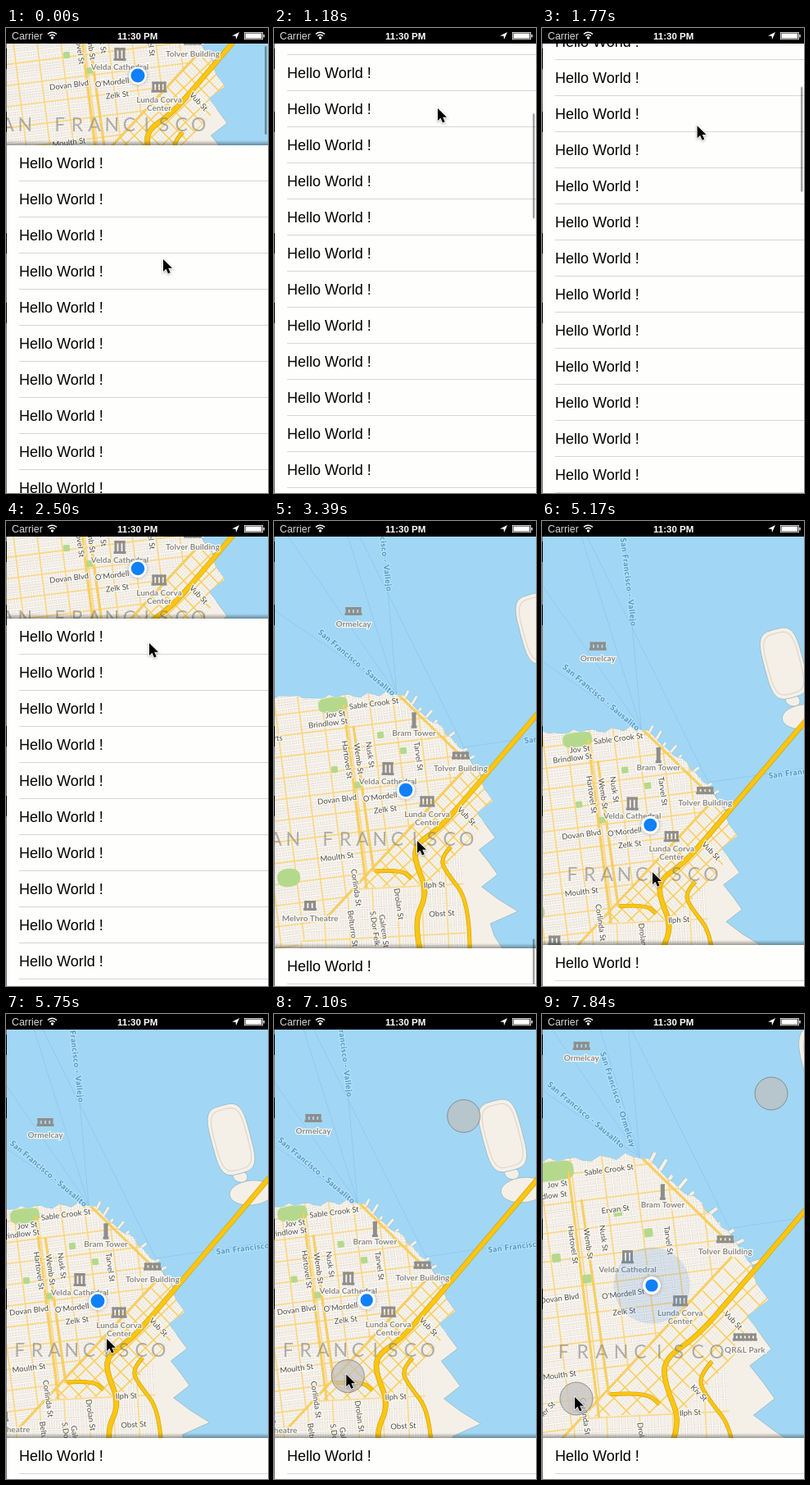
An HTML page with a canvas for the animation above (7.99 s loop, 320x567 px).

```html
<!DOCTYPE html>
<html lang="en">
<head>
<meta charset="utf-8">
<title>Map behind a list</title>
<style>
  html, body { margin: 0; width: 100%; height: 100%; overflow: hidden; background: #000; }
  canvas { display: block; width: 100vw; height: 100vh; }
</style>
</head>
<body>
<canvas id="stage" width="320" height="567"></canvas>
<script>
const ctx = document.getElementById('stage').getContext('2d');
const LOOP = 7990, STEP = 147, LAST_STEP = 53;
const SANS = '"Liberation Sans", Arial, sans-serif';
const LABEL = 'Lato, "Open Sans", sans-serif';
const LAND = '#f5f0e7', WATER = '#a1d7f4', SHORE = '#9fbfcc';
const HOME = [161, 400]; // location dot in map coordinates
const EAST = -.125, SOUTH = 1.43, DIAGONAL = .8; // street directions

// Time, list top, dot x, dot y, zoom, pointer x, pointer y
const poses = [
  [0, 143, 161, 58, 1, 192, 282],
  [1180, -319, 161, 58, 1, 200, 98],
  [2510, 119, 161, 58, 1, 175, 149],
  [3390, 521, 161, 328, 1, 175, 390],
  [4420, 517, 161, 400, 1, 152, 474],
  [5750, 517, 112, 350, 1, 123, 396],
  [6960, 517, 112, 350, 1, 91, 438],
  [7815, 517, 134, 331, 1.34, 40, 467]
];

function poseAt(t) {
  const i = poses.findIndex(p => p[0] > t);
  if (i < 0) return poses[poses.length - 1];
  const a = poses[i - 1], b = poses[i];
  const p = (t - a[0]) / (b[0] - a[0]), eased = p * p * (3 - 2 * p);
  return a.map((v, j) => v + (b[j] - v) * eased);
}

function seeded(seed) {
  return () => (seed = seed * 16807 % 2147483647) / 2147483647;
}

const times = (n, make) => Array.from({ length: n }, (_, i) => make(i));

function roughen(points, gap, amount) {
  const random = seeded(41);
  return points.slice(1).flatMap(([x, y], i) => {
    const [x0, y0] = points[i], n = Math.ceil(Math.hypot(x - x0, y - y0) / gap);
    return times(n, k => [x0 + (x - x0) * k / n, y0 + (y - y0) * k / n + (random() - .5) * amount]);
  });
}

// Rounded outline between an ellipse (power 1) and a box (power near 0)
function blob(cx, cy, rx, ry, angle, power) {
  const bend = v => Math.sign(v) * Math.abs(v) ** power, c = Math.cos(angle), s = Math.sin(angle);
  return times(32, i => {
    const a = i * Math.PI / 16, x = rx * bend(Math.cos(a)), y = ry * bend(Math.sin(a));
    return [cx + x * c - y * s, cy + x * s + y * c];
  });
}

const northShore = roughen([[-150, 291], [60, 287], [152, 282], [205, 325], [240, 362], [256, 388]], 8, 6);
const eastShore = times(16, i =>
  [256 + i + 12 * Math.sin(i * 2.1) + 22 * Math.exp(-((i - 10) ** 2)), 398 + i * 15]);
const mainland = [...northShore, ...eastShore, [-150, 680]];
const islands = [blob(349, 268, 27, 15, -.1, 1), blob(335, 248, 9, 7, .3, 1), blob(324, 203, 24, 43, -.26, .55)];
const northDistricts = [[-150, 250], [262, 250], [236, 374], [60, 560], [-150, 760]];
const southOfMarket = [[243, 368], [275, 420], [190, 515], [95, 520]];
const southDistricts = [[-150, 440], [228, 440], [240, 680], [-150, 680]];
const parks = [blob(72, 296, 18, 9, EAST, .6), blob(18, 507, 14, 11, EAST, .8),
  ...times(4, i => blob(74 + i * 28, 375 - i * 21 + i % 2 * 40, 4, 4, EAST, .3))];
const highways = [
  [[400, 215], [320, 309], [237, 407], [202, 447], [172, 467], [173, 490], [188, 525], [170, 563], [190, 640]],
  [[216, 469], [203, 483], [210, 500], [238, 535], [240, 640]],
  [[123, 499], [155, 497], [168, 508]]
];
const mainRoads = [[[234, 374], [60, 560]], [[152, 284], [226, 356]], [[85, 296], [113, 520]], [[97, 322], [122, 500]]];
const ferries = [...times(4, i => [[150, 283], [120 - 55 * i, -60 + 70 * i]]), [[232, 348], [50, -20]], [[232, 348], [480, 312]]];

// Street names with their centres, grouped by direction; late ones need a closer zoom
const streets = [
  { angle: EAST, names: [['Sable Crook St', 122, 295], ['Jov St', 75, 308], ['Brindlow St', 66, 319], ['Dovan Blvd', 77, 412],
    ["O'Mordell St", 135, 408], ['Zelk St', 136, 424], ['Moulth St', 77, 482]] },
  { angle: -.05, names: [['Ilph St', 196, 516], ['Obst St', 205, 551], ['rts', 5, 337]] },
  { angle: SOUTH, names: [['Hartovel St', 89, 363], ['Wemb St', 103, 362], ['Nusk St', 117, 357], ['Tarvel St', 176, 359],
    ['Corlinda St', 100, 519], ['Belturro St', 96, 569], ['S.Dor Felk', 123, 569], ['Galrem St', 134, 572], ['Drolan St', 152, 539]] },
  { angle: DIAGONAL, names: [['Vub St', 235, 432]] },
  { angle: DIAGONAL, late: true, names: [['Kiv St', 204, 498]] },
  { angle: EAST, late: true, names: [['Ervan St', 128, 331]] },
  { angle: -DIAGONAL, late: true, names: [['Bolner St', 62, 517]] }
];
const crossings = [
  { to: 'Vallejo', x: 134, y: 104, angle: 1.45 }, { to: 'Sausalito', x: 101, y: 245, angle: .7 },
  { to: 'Ormelcay', x: 130, y: 231, angle: 1.26, late: true }, { to: 'Alameda', x: 364, y: 333, angle: EAST }
];
const places = [
  { name: ['Ormelcay'], x: 97, y: 182, w: 21, h: 10 }, { name: ['Bram Tower'], x: 171, y: 315, w: 7, h: 19 },
  { name: ['Velda Cathedral'], x: 139, y: 374, w: 15, h: 16 }, { name: ['Tolver Building'], x: 228, y: 358, w: 22, h: 9 },
  { name: ['Lunda Corva', 'Center'], x: 187, y: 414, w: 19, h: 13 }, { name: ['Melvro Theatre'], x: 44, y: 541, w: 16, h: 12 },
  { name: ['QR&L Park'], x: 246, y: 447, w: 30, h: 9, late: true }
];

let zoom = 1, dot = HOME;
const place = (x, y) => [dot[0] + (x - HOME[0]) * zoom, dot[1] + (y - HOME[1]) * zoom];
const shown = item => !item.late || zoom > 1.15;

function path(points, close) {
  ctx.beginPath();
  for (const p of points) ctx.lineTo(...p);
  if (close) ctx.closePath();
}

function curve(points) {
  ctx.beginPath();
  ctx.moveTo(...points[0]);
  for (let i = 1; i < points.length - 1; i++) {
    const [x, y] = points[i], [nx, ny] = points[i + 1];
    ctx.quadraticCurveTo(x, y, (x + nx) / 2, (y + ny) / 2);
  }
  ctx.lineTo(...points[points.length - 1]);
}

function fill(points, color) {
  path(points, true);
  ctx.fillStyle = color;
  ctx.fill();
}

function stroke(color, width) {
  ctx.strokeStyle = color;
  ctx.lineWidth = width / zoom;
  ctx.stroke();
}

function road(points, width, color, edge) {
  curve(points);
  stroke(edge, width);
  stroke(color, width - 1.2);
}

function disc(x, y, r, color) {
  ctx.beginPath();
  ctx.arc(x, y, r, 0, 7);
  ctx.fillStyle = color;
  ctx.fill();
}

// Street blocks inside a region; every nth street is a yellow one
function grid(region, x, y, angle, gapX, gapY, nth, yellow) {
  ctx.save();
  path(region, true);
  ctx.clip();
  fill(region, LAND);
  ctx.translate(x, y);
  ctx.rotate(angle);
  for (const major of [false, true]) {
    for (let i = -50; i <= 50; i++) {
      if ((i % nth === 0) !== major) continue;
      for (const street of [[[i * gapX, -400], [i * gapX, 400]], [[-400, i * gapY], [400, i * gapY]]]) {
        path(street);
        stroke(major ? yellow : '#ded8ce', major ? 1.6 : 2.5);
        if (!major) stroke('#fffefb', 1.4);
      }
    }
  }
  ctx.restore();
}

function drawPiers() {
  for (let i = 0; i < 12; i++) {
    const p = i / 11, angle = -1.1 + .8 * p, length = 9 + 4 * Math.sin(i * 2.4);
    const x = 160 + 92 * p, y = 287 + 93 * p;
    path([[x, y], [x + length * Math.cos(angle), y + length * Math.sin(angle)]]);
    stroke(SHORE, 4.2 * zoom);
    stroke(LAND, 3 * zoom);
  }
}

function drawGround() {
  ctx.save();
  ctx.translate(...dot);
  ctx.scale(zoom, zoom);
  ctx.translate(-HOME[0], -HOME[1]);
  ctx.lineJoin = 'round';
  for (const f of ferries) {
    path(f);
    stroke('#8fc4ef', .8);
  }
  drawPiers();
  for (const land of [mainland, ...islands]) {
    fill(land, LAND);
    stroke(SHORE, 1);
  }
  path(blob(324, 203, 20, 38, -.26, .55), true);
  stroke('#ddd7cc', 1.2);

  ctx.save();
  path(mainland, true);
  ctx.clip();
  grid(southDistricts, 120, 520, -.05, 6, 12, 5, '#f9d98c');
  grid(northDistricts, 120, 320, EAST, 7.2, 6.4, 4, '#fad682');
  grid(southOfMarket, 236, 374, DIAGONAL, 8, 7, 2, '#f9cf62');
  parks.forEach(p => fill(p, '#b5d98c'));
  mainRoads.forEach(r => road(r, 2.8, '#fdd35c', '#efc052'));
  ctx.restore();
  highways.forEach((h, i) => road(h, i ? 5 : 6.5, '#fac60f', '#d49c08'));
  ctx.restore();
}

function mapLabel(text, x, y, angle, font, color, halo = 'rgba(255,253,247,.85)') {
  ctx.save();
  ctx.translate(x, y);
  ctx.rotate(angle);
  ctx.font = font + ' ' + LABEL;
  ctx.textAlign = 'center';
  ctx.textBaseline = 'middle';
  ctx.strokeStyle = halo;
  ctx.lineWidth = 2.4;
  ctx.strokeText(text, 0, 0);
  ctx.fillStyle = color;
  ctx.fillText(text, 0, 0);
  ctx.restore();
}

function drawIcon(x, y, w, h) {
  const columns = Math.round(w / 5), gap = w / columns;
  ctx.fillStyle = '#8f8e8c';
  ctx.fillRect(x - w / 2, y + h / 2 - 3, w, 3);
  ctx.fillRect(x - w / 2 + 1, y - h / 2, w - 2, 3);
  for (let i = 0; i < columns; i++) ctx.fillRect(x - w / 2 + i * gap + 1, y - h / 2, gap - 2, h);
}

function drawLabels() {
  const [cityX, cityY] = place(150.5, 461), pitch = 21.2 + 6.5 * (zoom - 1);
  ctx.font = '23px ' + LABEL;
  ctx.textAlign = 'center';
  ctx.textBaseline = 'middle';
  ctx.fillStyle = 'rgba(130,128,125,.6)';
  [...'SAN FRANCISCO'].forEach((c, i) => ctx.fillText(c, cityX + (i - 8) * pitch, cityY));

  for (const group of streets.filter(shown))
    for (const [text, x, y] of group.names) mapLabel(text, ...place(x, y), group.angle, '9.5px', '#4b4a48');
  ctx.letterSpacing = '.6px';
  for (const c of crossings.filter(shown))
    mapLabel('San Francisco - ' + c.to, ...place(c.x, c.y), c.angle, 'bold 9.6px', '#4a93c4', 'rgba(190,228,248,.8)');
  ctx.letterSpacing = '0px';
  for (const { name, x, y, w, h } of places.filter(shown)) {
    const [px, py] = place(x, y);
    drawIcon(px, py, w, h);
    name.forEach((text, i) => mapLabel(text, px, py + 15.5 + i * 10, 0, 'bold 10px', '#8a8987'));
  }
}

function drawLocation(t) {
  const pulse = ((t - 4130 + 6000) % 3000) / 1000;
  if (pulse < 1) disc(...dot, 26 + 30 * pulse, `rgba(40,125,225,${.46 * (1 - pulse)})`);
  ctx.save();
  ctx.shadowColor = 'rgba(0,0,0,.3)';
  ctx.shadowBlur = 4;
  disc(...dot, 11, '#fff');
  ctx.restore();
  disc(...dot, 8 + .5 * Math.cos(pulse * Math.PI * 2 / 3 + 2.4), '#0f80fa');
}

function drawScrollBar(t, top) {
  const resting = t > 3650 || (t > 2400 && t <= 2510);
  if (resting) return;
  const y = 22 + (top > 143 ? (top - 143) * 1.29 : (143 - top) * .178);
  ctx.fillStyle = 'rgba(0,0,0,.36)';
  ctx.beginPath();
  ctx.roundRect(316, y, 2.5, 128 - .14 * Math.max(0, top), 1.2);
  ctx.fill();
}

function drawList(t, top) {
  const shade = ctx.createLinearGradient(0, top - 6, 0, top);
  shade.addColorStop(0, 'rgba(0,0,0,0)');
  shade.addColorStop(1, 'rgba(0,0,0,.36)');
  ctx.fillStyle = shade;
  ctx.fillRect(0, top - 6, 320, 6);
  ctx.fillStyle = '#fefefd';
  ctx.fillRect(0, top, 320, 1000);
  ctx.font = '18px ' + SANS;
  ctx.textAlign = 'left';
  ctx.textBaseline = 'alphabetic';
  for (let y = top; y < 567; y += 44) {
    ctx.fillStyle = '#000';
    ctx.fillText('Hello World !', 16, y + 28);
    ctx.fillStyle = '#d6d5d8';
    ctx.fillRect(16, Math.round(y) + 43, 304, 1);
  }
  drawScrollBar(t, top);
}

function drawStatusBar() {
  ctx.fillStyle = '#000';
  ctx.fillRect(0, 0, 320, 19);
  ctx.textAlign = 'left';
  ctx.textBaseline = 'alphabetic';
  ctx.fillStyle = '#d8d8d8';
  ctx.font = '12.4px ' + SANS;
  ctx.fillText('Carrier', 7, 14);
  ctx.fillStyle = ctx.strokeStyle = '#fff';
  ctx.font = 'bold 11.5px ' + SANS;
  ctx.fillText('11:30 PM', 136, 13.5);
  ctx.lineWidth = 1.6;
  for (const r of [4.6, 7.8]) {
    ctx.beginPath();
    ctx.arc(56.5, 13, r, -2.35, -.79);
    ctx.stroke();
  }
  disc(56.5, 12, 1.7, '#fff');
  fill([[285, 5], [276, 9.5], [280.5, 9.8], [281, 14]], '#fff');
  ctx.lineWidth = .8;
  ctx.strokeRect(291.4, 5.4, 22, 8.4);
  ctx.fillRect(292.5, 6.5, 19.8, 6.2);
  ctx.fillRect(314.4, 8, 1.3, 3.4);
}

function drawEdge() {
  ctx.fillStyle = '#777';
  ctx.fillRect(0, 19, 1, 548);
  ctx.fillStyle = '#000';
  for (const y of [25, 102, 250, 335]) ctx.fillRect(0, y, 1, 25);
}

function drawPointer(t, x, y) {
  if (t > 6300) {
    for (const [cx, cy] of [[x + 2, y + 2], [320 - x, 564 - y]]) {
      disc(cx, cy, 20, 'rgba(192,190,188,.7)');
      ctx.strokeStyle = 'rgba(120,120,120,.75)';
      ctx.lineWidth = 1;
      ctx.stroke();
    }
  }
  ctx.save();
  ctx.translate(x, y);
  ctx.shadowColor = 'rgba(0,0,0,.35)';
  ctx.shadowBlur = 3;
  ctx.shadowOffsetY = 1;
  path([[0, 0], [0, 15], [3.5, 11.8], [6, 17.5], [8.7, 16.3], [6.2, 10.8], [11, 10.8]], true);
  ctx.lineWidth = 1.6;
  ctx.strokeStyle = '#fff';
  ctx.stroke();
  ctx.shadowColor = 'transparent';
  ctx.fillStyle = '#000';
  ctx.fill();
  ctx.restore();
}

function draw() {
  const step = Math.min(LAST_STEP, Math.floor((performance.now() - start) % LOOP / STEP));
  const t = step * 147.5;
  const [, listTop, dotX, dotY, scale, pointerX, pointerY] = poseAt(t);
  dot = [dotX, dotY];
  zoom = scale;
  ctx.fillStyle = WATER;
  ctx.fillRect(0, 0, 320, 567);
  drawGround();
  drawLabels();
  drawLocation(t);
  drawList(t, listTop);
  drawStatusBar();
  drawEdge();
  drawPointer(t, pointerX, pointerY);
  requestAnimationFrame(draw);
}

const start = performance.now();
draw();
</script>
</body>
</html>
```
